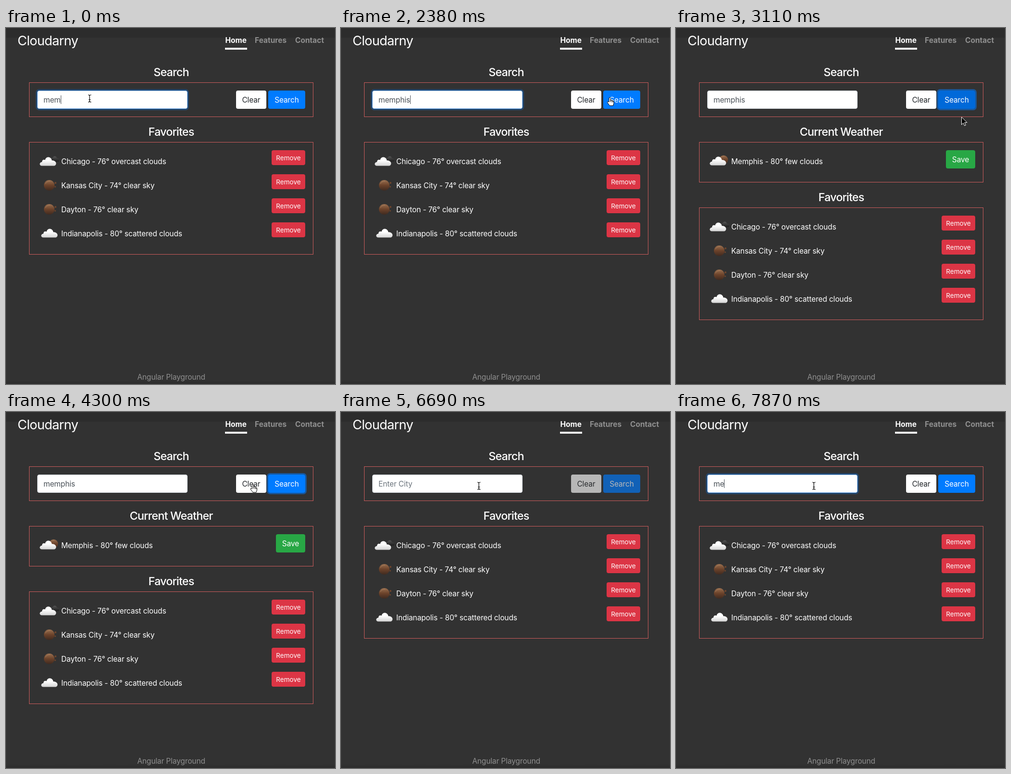
Write an HTML page that moves like this. It is 685 px wide and 740 px high and loops after 8 s.

```html
<!DOCTYPE html>
<html lang="en">
<head>
<meta charset="utf-8">
<title>Weather search</title>
<style>
html, body { margin: 0; width: 100%; height: 100%; overflow: hidden; background: #323232; }
svg { display: block; }
text { font: 15.5px Inter, sans-serif; letter-spacing: -.13px; font-optical-sizing: none; fill: #fff; white-space: pre; }
.mid { text-anchor: middle; }
.brand { font-size: 27.2px; letter-spacing: -.7px; }
.head { font-size: 23.3px; font-weight: 500; letter-spacing: -.78px; }
.nav { font-weight: 700; letter-spacing: 0; }
.small { font-size: 13.6px; letter-spacing: 0; }
.dim { fill: #8f8f8f; }
.box { fill: none; stroke: #cd5c5c; }
</style>
</head>
<body>
<svg id="stage" width="685" height="740" viewBox="0 0 685 740">
  <defs>
    <linearGradient id="white" x2="0" y2="1"><stop offset=".35" stop-color="#fff"/><stop offset="1" stop-color="#d4d4d4"/></linearGradient>
    <linearGradient id="dark" x2="0" y2="1"><stop stop-color="#555"/><stop offset="1" stop-color="#1e1e1e"/></linearGradient>
    <linearGradient id="brown" x2="0" y2="1"><stop stop-color="#9a7050"/><stop offset=".5" stop-color="#6b422a"/><stop offset="1" stop-color="#3f2a20"/></linearGradient>
    <path id="cloud" d="M5 18.5C-1.500 18.500-1 11 5 10.500C5 6 9 5 11.500 6.500C13-1.500 24-1.500 25.500 7.500C30 6.500 36 11 34 15.500C33 18 31 18.500 29 18.500Z"/>
    <g id="moon"><circle r="11" fill="url(#brown)"/><path d="M-8-3Q-5-9 2-8.500" fill="none" stroke="#b08a6c" stroke-opacity=".6"/></g>
    <g id="clear"><use href="#moon" x="90" y="50"/><g fill="#70462d"><circle cx="103" cy="45" r="2"/><circle cx="102.500" cy="53" r="1.500"/></g></g>
    <g id="scattered"><use href="#cloud" x="73" y="40" fill="url(#white)"/></g>
    <g id="front"><use href="#cloud" x="70" y="41" fill="url(#white)"/></g>
    <g id="overcast"><use href="#cloud" transform="translate(90 39) scale(.63)" fill="url(#dark)"/><use href="#front"/></g>
    <g id="few"><use href="#moon" transform="translate(99 47) scale(.85)"/><use href="#front" y="-1"/></g>
    <path id="arrow" d="M0 0V16L3.700 12.500L6.200 18L8.800 17L6.400 11.500H11.500Z" fill="#000" stroke="#fff"/>
    <path id="hand" d="M4 10V2Q4 .5 5.500 .5T7 2V7Q7.500 5.500 9 6T10 7.500Q11 6 12.300 7.500Q14 7 14 9.500V12.500L12.500 17.500H5.500L1 11.500Q0 9 2 8.700Z M7 7V10M10 7.500V10.500M12.300 8V10.500" fill="#fff" stroke="#000"/>
    <g id="beam" fill="none"><path id="stem" d="M-3-7Q0-7 0-5Q0-7 3.500-7M0-5V6M-3 8Q0 8 0 6Q0 8 3.500 8M-2 3H2.500" stroke="#000" stroke-width="1.200"/></g>
    <g id="denied"><use href="#arrow" transform="scale(.92)"/><g fill="none"><path id="ban" d="M3.500 16.500L14.500 27.500M1.500 22a7.500 7.500 0 1 0 15 0a7.500 7.500 0 1 0-15 0" stroke="#222" stroke-width="4"/><use href="#ban"/><path d="M3.500 16.500L14.500 27.500M1.500 22a7.500 7.500 0 1 0 15 0a7.500 7.500 0 1 0-15 0" stroke="#e4e4e4" stroke-width="2.200"/></g></g>
    <linearGradient id="foot" x2="0" y2="1"><stop stop-color="#323232"/><stop offset="1" stop-color="#2c2c2c"/></linearGradient>
  </defs>
  <rect width="685" height="740" fill="#323232"/>
  <rect width="685" height="20" fill="#2c2c2c"/>
  <rect y="732" width="685" height="8" fill="url(#foot)"/>
  <text class="brand" x="24" y="36">Cloudarny</text>
  <text class="nav" x="456.500" y="31">Home</text>
  <text class="nav dim" x="518" y="31">Features</text>
  <text class="nav dim" x="602" y="31">Contact</text>
  <rect x="456" y="41" width="46" height="4" fill="#fff"/>
  <text class="mid dim" x="344" y="731">Angular Playground</text>
  <g id="view"></g>
</svg>
<script>
const LOOP = 8000;
const favorites = [
  ['overcast', 'Chicago - 76° overcast clouds'],
  ['clear', 'Kansas City - 74° clear sky'],
  ['clear', 'Dayton - 76° clear sky'],
  ['scattered', 'Indianapolis - 80° scattered clouds']
];

// Each step changes only the listed parts of the state.
const steps = [
  [0, { text: 'mem', end: 114.5, caret: true, focus: 'input', search: '#007bff', clear: '#fff', cursor: 'beam', x: 174, y: 146 }],
  [290, { text: 'memp', end: 123.5 }],
  [740, { text: 'memph', end: 132.5 }],
  [890, { text: 'memphi', end: 136.5 }],
  [1190, { text: 'memphis', end: 144.5 }],
  [1640, { caret: false }],
  [1930, { x: 236, y: 148 }],
  [2080, { cursor: 'arrow', x: 420, y: 150 }],
  [2230, { caret: true, x: 526, y: 148 }],
  [2380, { cursor: 'hand', x: 554, y: 144 }],
  [2530, { search: '#0072ec', x: 580, y: 155 }],
  [2670, { search: '#0069d9', caret: false, x: 587, y: 157 }],
  [2960, { focus: 'search' }],
  [3110, { result: true, cursor: 'arrow', x: 594.5, y: 185 }],
  [3260, { search: '#0072ec', x: 597, y: 182 }],
  [3410, { search: '#007bff', x: 597.5, y: 181 }],
  [3560, { x: 598, y: 180 }],
  [4000, { x: 582, y: 175 }],
  [4150, { x: 537, y: 161 }],
  [4300, { cursor: 'hand', x: 508.5, y: 149.5 }],
  [5790, { text: '', end: 78.5, result: false, focus: '', off: true, clear: '#9d9fa2', cursor: 'denied', x: 512.5, y: 148 }],
  [5940, { clear: '#fff' }],
  [6240, { cursor: 'arrow', x: 462, y: 150 }],
  [6390, { x: 392, y: 152 }],
  [6540, { cursor: 'beam', x: 308, y: 153 }],
  [6690, { x: 287, y: 153 }],
  [6840, { focus: 'input', caret: true }],
  [7280, { caret: false }],
  [7730, { text: 'm', end: 91.5, caret: true, off: false }],
  [7870, { text: 'me', end: 100.5 }]
];

const label = (x, y, s, cls = '', fill = '') =>
  `<text x="${x}" y="${y}" class="${cls}"${fill && ` style="fill:${fill}"`}>${s}</text>`;
const rect = (x, y, w, h, fill, r = 4, extra = '') =>
  `<rect x="${x}" y="${y}" width="${w}" height="${h}" rx="${r}" fill="${fill}" ${extra}/>`;
const ring = (x, w, alpha) =>
  rect(x - 1.5, 128.5, w + 3, 41, 'none', 5.5, `stroke="#007bff" stroke-opacity="${alpha}" stroke-width="3"`);
const panel = (title, y, h) => label(344, y - 13, title, 'mid head') +
  `<rect class="box" x="48.5" y="${y + .5}" width="591" height="${h}"/>`;
const button = (x, y, w, h, fill, s, color = '#fff', cls = '') =>
  rect(x, y, w, h, fill) + label(x + w / 2, y + h / 2 + (cls ? 5.2 : 6), s, 'mid ' + cls, color);
const row = (icon, s, y) => `<use href="#${icon}" y="${y}"/>` + label(115, y + 56, s);

function searchPanel(s) {
  const focused = s.focus === 'input';
  const clearText = s.clear === '#fff' ? '#212529' : '#84868a';
  return panel('Search', 113, 71) +
    (focused ? ring(65, 313, .28) : '') +
    rect(65.5, 130.5, 312, 37, '#fff', 3.5, `stroke="${focused ? '#80bdff' : '#ced4da'}"`) +
    label(78, 155, s.text || 'Enter City', '', s.text ? '#495057' : '#6c757d') +
    (s.caret ? rect(s.end - .5, 140, 1, 18, '#495057', 0) : '') +
    (s.focus === 'search' ? ring(546, 77, .5) : '') +
    `<g opacity="${s.off ? .65 : 1}">` +
    button(479, 130, 63, 38, s.clear, 'Clear', clearText) +
    button(546, 130, 77, 38, s.search, 'Search') + '</g>';
}

function favoritesPanel(y) {
  return panel('Favorites', y, 233) + favorites.map(([icon, s], i) => {
    const top = y + 50 * i;
    return row(icon, s, top - 10) + button(553, top + 17, 70, 31, '#dc3545', 'Remove', '#fff', 'small');
  }).join('');
}

const draw = s => searchPanel(s) +
  (s.result ? panel('Current Weather', 237, 83) + row('few', 'Memphis - 80° few clouds', 227) +
    button(562, 254, 61, 38, '#28a745', 'Save') : '') +
  favoritesPanel(s.result ? 373 : 237) +
  `<use href="#${s.cursor}" x="${s.x}" y="${s.y}"/>`;

const view = document.getElementById('view');
let shown = -1;
function frame(now) {
  const t = now % LOOP;
  const past = steps.filter(([start]) => start <= t);
  if (past.length !== shown) {
    shown = past.length;
    view.innerHTML = draw(Object.assign({}, ...past.map(([, change]) => change)));
  }
  requestAnimationFrame(frame);
}
frame(0);
</script>
</body>
</html>
```
